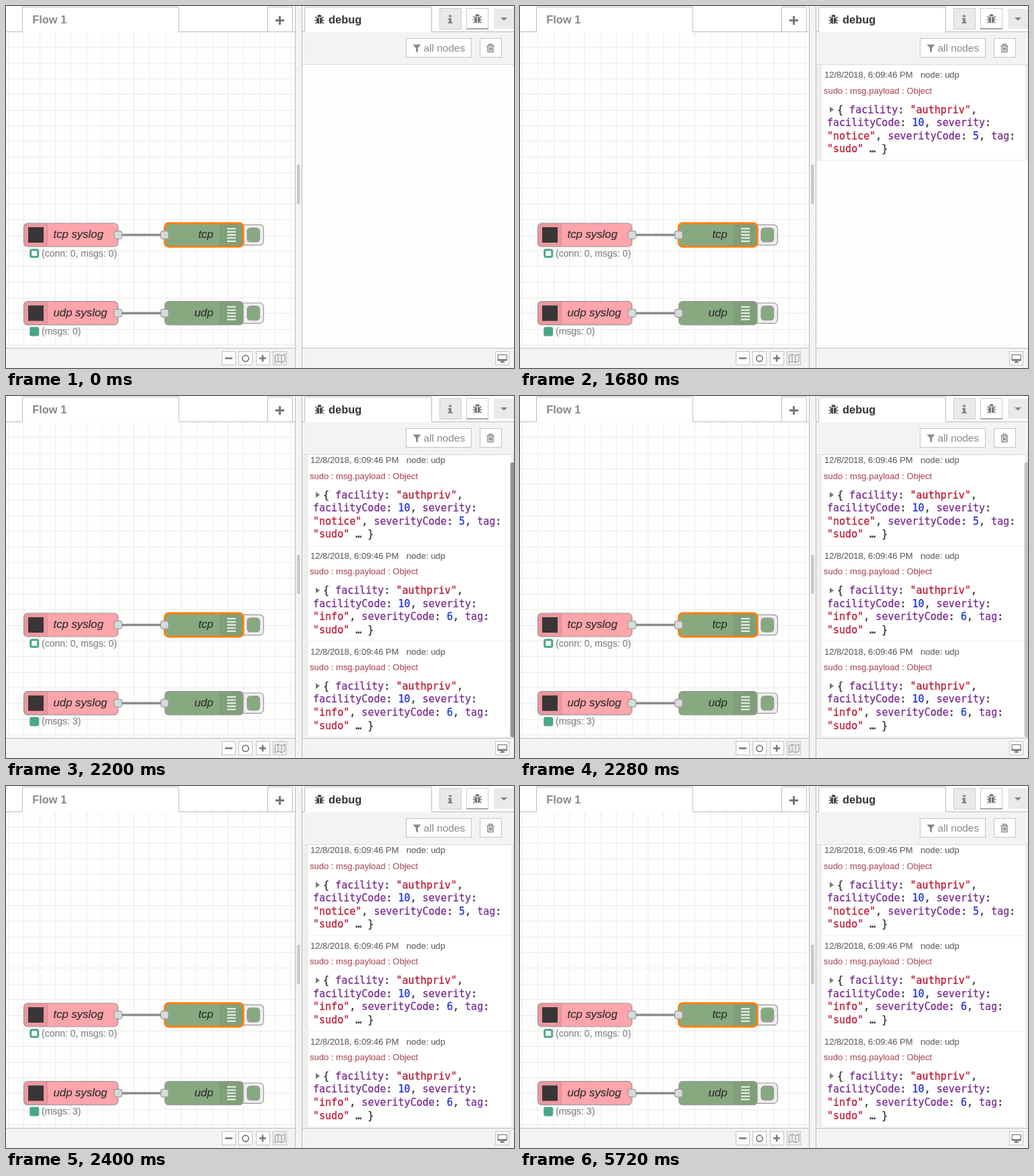
Write an HTML page that moves like this. It is 756x540 px and loops after 7200 ms.

```html
<!DOCTYPE html>
<html lang="en">
<head>
<meta charset="utf-8">
<title>Flow editor with debug sidebar</title>
<style>
  html, body { margin: 0; width: 100%; height: 100%; overflow: hidden; background: #fefefd; }
  svg { display: block; width: 756px; height: 540px; }
  text { font-family: "Liberation Sans", Arial, sans-serif; white-space: pre; }
  .tab { font-size: 16.4px; font-weight: bold; }
  .label { font-size: 16.75px; font-style: italic; fill: #333; stroke: #333; stroke-width: .2px; }
  .status { font-size: 14px; fill: #888; stroke: #888; stroke-width: .2px; }
  .meta { font-size: 13px; fill: #666; stroke: #666; stroke-width: .15px; }
  .topic { font-size: 13px; fill: #ad5560; stroke: #ad5560; stroke-width: .15px; }
  .code { font: 15.03px "DejaVu Sans Mono", monospace; fill: #333; stroke: #333; stroke-width: .3px; }
  .key { fill: #792e90; stroke: #792e90; }
  .str { fill: #bd1b36; stroke: #bd1b36; }
  .num { fill: #2033d6; stroke: #2033d6; }
</style>
</head>
<body>
<svg id="stage" viewBox="0 0 756 540" xmlns="http://www.w3.org/2000/svg"></svg>
<script>
const LOOP = 7200;
const GRID = 23.36;
const ROW = 142.6;

const rect = (x, y, w, h, fill, extra = '') =>
  `<rect x="${x}" y="${y}" width="${w}" height="${h}" fill="${fill}" ${extra}/>`;
const line = (d, color = '#bbb', width = 1) =>
  `<path d="${d}" fill="none" stroke="${color}" stroke-width="${width}"/>`;
const shape = (d, fill) => `<path d="${d}" fill="${fill}"/>`;
const text = (x, y, cls, body, extra = '') =>
  `<text x="${x}" y="${y}" class="${cls}" ${extra}>${body}</text>`;
const box = (x, y, w, h, fill = '#fff', stroke = '#c4c4c4') =>
  rect(x + .5, y + .5, w - 1, h - 1, fill, `stroke="${stroke}"`);
const span = (cls, body) => `<tspan class="${cls}">${body}</tspan>`;

function grid() {
  let d = '';
  for (let x = 3; x < 430; x += GRID) d += `M${Math.round(x) + .5} 39V510`;
  for (let y = 341.5 - 12 * GRID; y < 510; y += GRID) d += `M0 ${Math.round(y) + .5}H430`;
  return line(d, '#ececec');
}

function bug(cx, cy, color) {
  return `<g transform="translate(${cx} ${cy})">` +
    shape('M-3.2 -3.6A3.2 3.4 0 0 1 3.2 -3.6Z', color) +
    shape('M-4 -2.6H-.5V6.8C-3 6.6 -4.3 4.6 -4.3 1.5ZM4 -2.6H.5V6.8C3 6.6 4.3 4.6 4.3 1.5Z', color) +
    line('M-4 -1.5L-6 -4M4 -1.5L6 -4M-4 1.3H-7M4 1.3H7M-3.8 4L-6 6.5M3.8 4L6 6.5', color, 1.3) +
    '</g>';
}

const outline = (radius, color = '#999', width = 1.17) =>
  `rx="${radius}" stroke="${color}" stroke-width="${width}"`;
const port = (x, y) => rect(x, y - 5.8, 11.7, 11.7, '#d9d9d9', outline(3.5));

function flowRow(y, name, selected) {
  const top = y - 17.5;
  const edge = selected ? outline(5.8, '#ff7f0e', 3) : outline(5.8);
  let bars = '';
  for (let i = -2; i <= 2; i++) bars += `M329 ${y + i * 4.67}h13`;
  return line(`M172 ${y}H231`, '#8c8c8c', 3.5) +
    rect(26.5, top, 140, 35, '#ffa5ab', outline(5.8)) +
    shape(`M61.5 ${top + .5}H32a5 5 0 0 0 -5 5v24a5 5 0 0 0 5 5H61.5Z`, 'rgba(0,0,0,.08)') +
    line(`M61.5 ${top}v35`, '#d98f94') +
    rect(33, y - 11.5, 23, 23, '#3b3537') +
    text(70.5, y + 4.7, 'label', name + ' syslog') +
    rect(346, y - 15.2, 37.4, 30.4, '#eee', outline(5.8)) +
    rect(358.9, y - 10.5, 18.7, 21, '#87a980', outline(4.7)) +
    rect(236.3, top, 116.8, 35, '#87a980', 'rx="5.8"') +
    shape(`M318 ${top}h29.3a5.8 5.8 0 0 1 5.8 5.8v23.4a5.8 5.8 0 0 1 -5.8 5.8H318Z`, 'rgba(0,0,0,.06)') +
    line(`M318.5 ${top}v35`, '#779671') +
    line(bars, '#e4ebe2', 2.3) +
    rect(236.3, top, 116.8, 35, 'none', edge) +
    text(308.5, y + 4.7, 'label', name, 'text-anchor="end"') +
    port(160.8, y) + port(230.3, y);
}

function message(i, severity, code) {
  const y = 88.3 + i * ROW;
  const str = s => span('str', `"${s}"`);
  const key = k => span('key', k) + ': ';
  const rows = [
    [472, `{ ${key('facility')}${str('authpriv')},`],
    [457, `${key('facilityCode')}${span('num', 10)}, ${key('severity')}`],
    [457, `${str(severity)}, ${key('severityCode')}${span('num', code)}, ${key('tag')}`],
    [457, `${str('sudo')} … }`]
  ];
  return `<g id="msg${i}">` +
    rect(440.5, y, 316, ROW, '#eee') +
    rect(450, y, 302, ROW - 1.2, '#fff') +
    text(453, y + 19, 'meta', '12/8/2018, 6:09:46 PM') +
    text(596, y + 19, 'meta', 'node: udp') +
    text(452, y + 42.3, 'topic', 'sudo : msg.payload : Object') +
    shape(`M461 ${y + 61.8}l6 4.3l-6 4.3Z`, '#777') +
    rows.map(([x, t], n) => text(x, y + 71.3 + n * 19.6, 'code', t)).join('') +
    '</g>';
}

function workspace() {
  const green = '#4aa785';
  return grid() + rect(0, 0, 430, 38, '#fff') +
    line('M0 38.5H24.5V1.5H257V38.5H430M389.5 38V1.5H426.5V38') +
    text(39.3, 26, 'tab', 'Flow 1', 'fill="#888"') +
    line('M401 21.5H414M407.5 15V28', '#777', 3) +
    flowRow(341.5, 'tcp', true) + flowRow(458.2, 'udp', false) +
    rect(36.7, 363.7, 11, 10.6, '#fff', outline(2, green, 3)) +
    text(53, 373.5, 'status', '(conn: 0, msgs: 0)') +
    rect(35.2, 478.8, 14, 13.6, green, 'rx="3"') +
    text(53, 490.2, 'status', '', 'id="count"') +
    rect(0, 510, 430, 30, '#f3f3f4') + line('M0 510.5H430') +
    [321, 346, 372].map(x => box(x, 515, 21, 21)).join('') + box(397, 515, 21, 21, '#eee') +
    line('M326 525.5h11M377 525.5h10M382 520.5v10', '#777', 2.6) +
    '<circle cx="356.5" cy="525.8" r="4.6" fill="none" stroke="#777" stroke-width="1.7"/>' +
    line('M400.5 521.5l4.5 -2l5 2l5 -2v10.5l-5 2l-5 -2l-4.5 2ZM405 519.5v10.5M410 521.5v10.5', '#999', 1.1);
}

function sidebarTop() {
  return rect(440, 0, 316, 88, '#fff') +
    rect(440, 39, 316, 48, '#f3f3f4') + line('M440 87.5H756', '#ddd') +
    line('M440 38.5H444.5V1.5H633.5V38.5H756') +
    bug(466.5, 20, '#444') + text(480, 26, 'tab', 'debug', 'fill="#333"') +
    box(645, 3, 33, 32, '#e9e9eb', '#ccc') +
    shape('M659 13.5h4v3h-4ZM658 18h5v6h1.5v2h-7v-2h1.5v-4h-1Z', '#888') +
    box(685, 3, 33, 32, '#fff', '#ccc') + rect(685, 33, 33, 2, '#aaa') + bug(701.5, 19, '#777') +
    rect(726, 4, 30, 30, '#eaeaec') + shape('M736 17h10l-5 5Z', '#888') +
    box(595, 48, 98, 29) + shape('M605.5 57.5h12l-4.6 5.3v7l-2.8 -2.4v-4.6Z', '#888') +
    text(621.5, 68.3, '', 'all nodes', 'font-size="15.4" fill="#888"') +
    box(705, 48, 33, 29) +
    line('M715.5 59.5h11M718.8 59v-2h4.4v2M717 60v8.5h8V60M719.5 61.5v5M721 61.5v5M722.8 61.5v5', '#888', 1.4);
}

const sidebarBottom = () =>
  rect(440, 510, 316, 30, '#f3f3f4') + line('M440 510.5H756') + box(728, 515, 21, 21) +
  rect(731.5, 519.5, 14.5, 10, '#777', 'rx="1.2"') + rect(732.7, 520.7, 12.1, 6, '#fff') +
  shape('M737 529.5h3.5v1.3h1.7v1.4h-6.9v-1.4h1.7Z', '#777');

const divider = () =>
  rect(430, 0, 11, 540, '#f3f3f4') + line('M430.5 0V540M440.5 0V540') +
  rect(433, 237, 4.5, 58, '#c9c9c9', 'rx="1"');

const $ = id => document.getElementById(id);
$('stage').innerHTML = rect(0, 0, 756, 540, '#fefefd') + workspace() +
  '<clipPath id="view"><path d="M440 88H756V510H440Z"/></clipPath>' +
  '<g clip-path="url(#view)"><g id="list">' +
  message(0, 'notice', 5) + message(1, 'info', 6) + message(2, 'info', 6) + '</g>' +
  rect(750.5, 99, 8, 410, '#808080', 'id="bar" rx="3"') + '</g>' +
  sidebarTop() + sidebarBottom() + divider();

// [time, visible messages, udp count, scroll, scrollbar opacity]
const steps = [
  [0, 0, 0, 0, 0],
  [1680, 1, 0, 0, 0],
  [1720, 3, 3, 7, 1],
  [2200, 3, 3, 7, .82],
  [2240, 3, 3, 7, .62],
  [2280, 3, 3, 7, .42],
  [2320, 3, 3, 7, .2],
  [2400, 3, 3, 7, 0]
];
let shown;

function draw(now) {
  const t = now % LOOP;
  const step = steps.findLast(s => s[0] <= t);
  if (step !== shown) {
    const [, visible, count, scroll, alpha] = shown = step;
    for (let i = 0; i < 3; i++) $('msg' + i).style.display = i < visible ? '' : 'none';
    $('count').textContent = `(msgs: ${count})`;
    $('list').setAttribute('transform', `translate(0 ${-scroll})`);
    $('bar').setAttribute('opacity', alpha);
  }
}

const start = performance.now();
function tick() {
  draw(performance.now() - start);
  requestAnimationFrame(tick);
}
tick();
</script>
</body>
</html>
```
